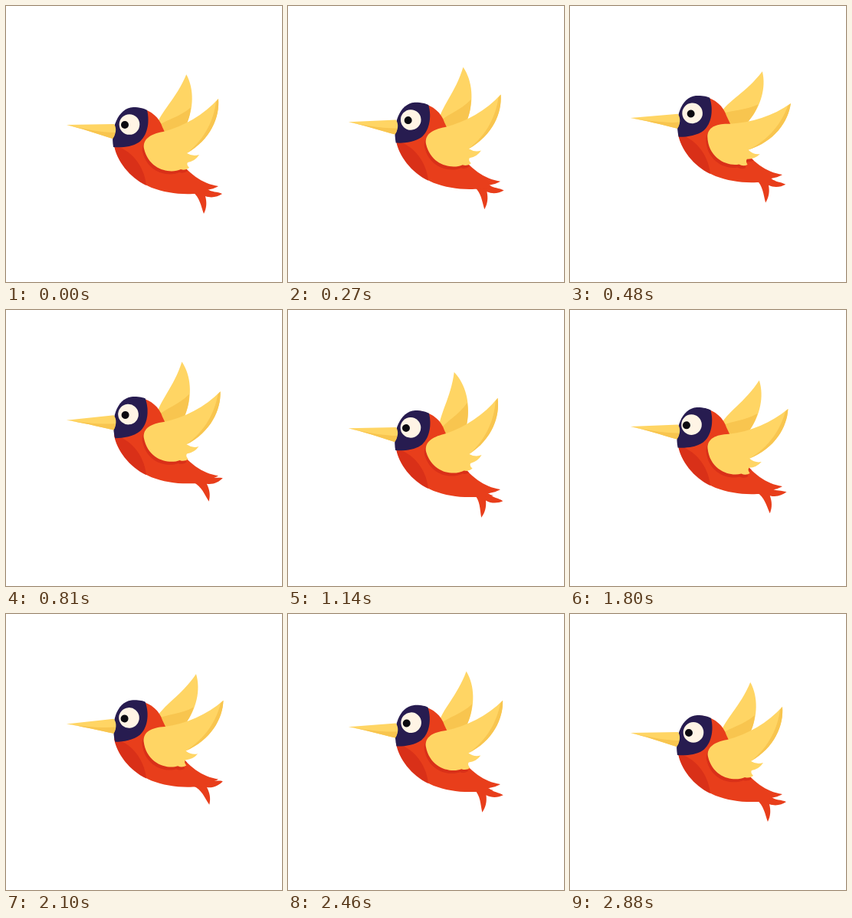
Recreate the animation shown at these times as an HTML page with a canvas. Size 360 by 360 pixels, loop 2.91 s.

```html
<!DOCTYPE html>
<html>
<head>
<meta charset="utf-8">
<title>Flying bird</title>
<style>
html, body { margin: 0; width: 100%; height: 100%; overflow: hidden; background: #fff; }
canvas { display: block; width: 360px; height: 360px; }
</style>
</head>
<body>
<canvas id="stage" width="360" height="360"></canvas>
<script>
const ctx = document.getElementById('stage').getContext('2d');
const LOOP = 2910, STEP = 30, RAD = Math.PI / 180;

const YELLOW = '#ffd564', AMBER = '#f8c54f', RED = '#e83e1b', DARK = '#d93018',
  NAVY = '#271c50', CREAM = '#fff4e5';

const shapes = {
  backWing: 'M196 157 C201 138 222 121 235 89 C246 109 244 134 236 153 L228 172 L202 172 Z',
  backShade: 'M199 156 C209 148 226 145 241 132 C240 142 238 149 234 157 L226 172 L202 172 Z',
  fork: 'M243 242 C253 250 254 260 258 271 C262 263 262 256 260 248 C268 251 276 249 282 245 C276 242 268 243 263 239 L246 235 Z',
  body: 'M142 170 C142 147 158 132 174 133 C190 136 200 146 204 158 L222 196 C237 218 256 232 277 235 C271 239 264 239 260 241 L268 243 C260 246 251 245 244 245 C225 246 206 243 190 237 C164 226 144 202 141 180 Z',
  belly: 'M141 182 C162 187 180 207 183 234 C161 224 144 201 141 182 Z',
  head: 'M140 184 C136 160 146 133 166 132 C174 132 181 134 184 136 C188 152 184 170 173 178 C164 184 150 185 140 184 Z',
  beak: 'M79 155 L141 154 C145 160 143 168 139 173 C120 167 96 159 79 155 Z',
  beakShade: 'M79 155 C100 160 124 165 142 165 C142 168 141 171 139 173 C120 167 96 159 79 155 Z',
  wing: 'M180 186 C178 174 188 167 205 164 C232 157 258 142 277 121 C279 145 267 174 236 192 Q244 197 252 194 Q247 202 237 204 Q235 207 239 211 Q234 215 228 213 C215 219 187 215 180 186 Z',
  wingEdge: 'M277 121 C279 145 267 174 236 192 C260 173 271 148 274 125 Z'
};
for (const name in shapes) shapes[name] = new Path2D(shapes[name]);

// Keys are [time, value] pairs.
const bobKeys = [[0, 0], [720, -20], [1440, 10], [2160, -20], [2910, 0]];
const tailKeys = [[0, 0], [480, 5], [800, -12], [1140, 10], [1560, 1], [2100, -13], [2460, 8], [2910, 0]];
const eyeKeys = [[0, 161], [480, 160], [1140, 160], [1560, 157], [2100, 161], [2910, 161]];
const pupilKeys = [[0, -6], [480, -2], [1140, -6], [1560, -7], [2100, -6], [2910, -6]];
const backTurns = [[0, -0.218], [480, 1.652], [1140, 4], [1560, 5.5], [2100, 7.319], [2320, 8], [2460, 8.198], [2880, 9.782], [2910, 9.782]];
const frontTurns = [[0, -0.138], [480, 1.62], [1140, 4], [1560, 5.5], [2100, 7.266], [2320, 8], [2460, 8.2], [2880, 9.862], [2910, 9.862]];

const linear = u => u;
const smooth = u => (1 - Math.cos(Math.PI * u)) / 2;

function sample(keys, t, ease = smooth) {
  let i = 1;
  while (i < keys.length - 1 && t > keys[i][0]) i++;
  const [t0, a] = keys[i - 1], [t1, b] = keys[i];
  return a + (b - a) * ease((t - t0) / (t1 - t0));
}

const flap = (keys, t) => Math.cos(2 * Math.PI * sample(keys, t, linear));

function fill(name, color) {
  ctx.fillStyle = color;
  ctx.fill(shapes[name]);
}

function disc(x, y, r, color) {
  ctx.fillStyle = color;
  ctx.beginPath();
  ctx.arc(x, y, r, 0, 2 * Math.PI);
  ctx.fill();
}

function turned(x, y, deg, paint) {
  ctx.save();
  ctx.translate(x, y);
  ctx.rotate(deg * RAD);
  ctx.translate(-x, -y);
  paint();
  ctx.restore();
}

function draw(t) {
  const bob = sample(bobKeys, t);
  const backTilt = 62 - (58 + 19 * flap(backTurns, t));
  const frontTilt = 34.8 - (29 + 9 * flap(frontTurns, t));

  ctx.fillStyle = '#fff';
  ctx.fillRect(0, 0, 360, 360);
  ctx.save();
  ctx.translate(0, bob);

  turned(200, 155, backTilt, () => {
    fill('backWing', YELLOW);
    fill('backShade', AMBER);
  });
  turned(250, 238, sample(tailKeys, t), () => fill('fork', RED));
  fill('body', RED);
  fill('belly', DARK);

  turned(165, 160, bob * 0.27, () => {
    fill('head', NAVY);
    fill('beak', YELLOW);
    fill('beakShade', AMBER);
    const x = sample(eyeKeys, t);
    disc(x, 154.5, 13.3, CREAM);
    disc(x + sample(pupilKeys, t), 155, 5, '#0b0a10');
  });

  // Wing shadow stays on the body.
  ctx.save();
  ctx.clip(shapes.body);
  ctx.translate(-2, 4);
  turned(185, 182, frontTilt, () => fill('wing', DARK));
  ctx.restore();

  turned(185, 182, frontTilt, () => {
    fill('wing', YELLOW);
    fill('wingEdge', AMBER);
  });
  ctx.restore();
}

const start = performance.now();

function tick() {
  let k = Math.floor(((performance.now() - start) % LOOP) / STEP);
  if (k > 1 && k % 6 === 1) k--; // one held step in six
  draw(k * STEP);
  requestAnimationFrame(tick);
}
tick();
</script>
</body>
</html>
```
